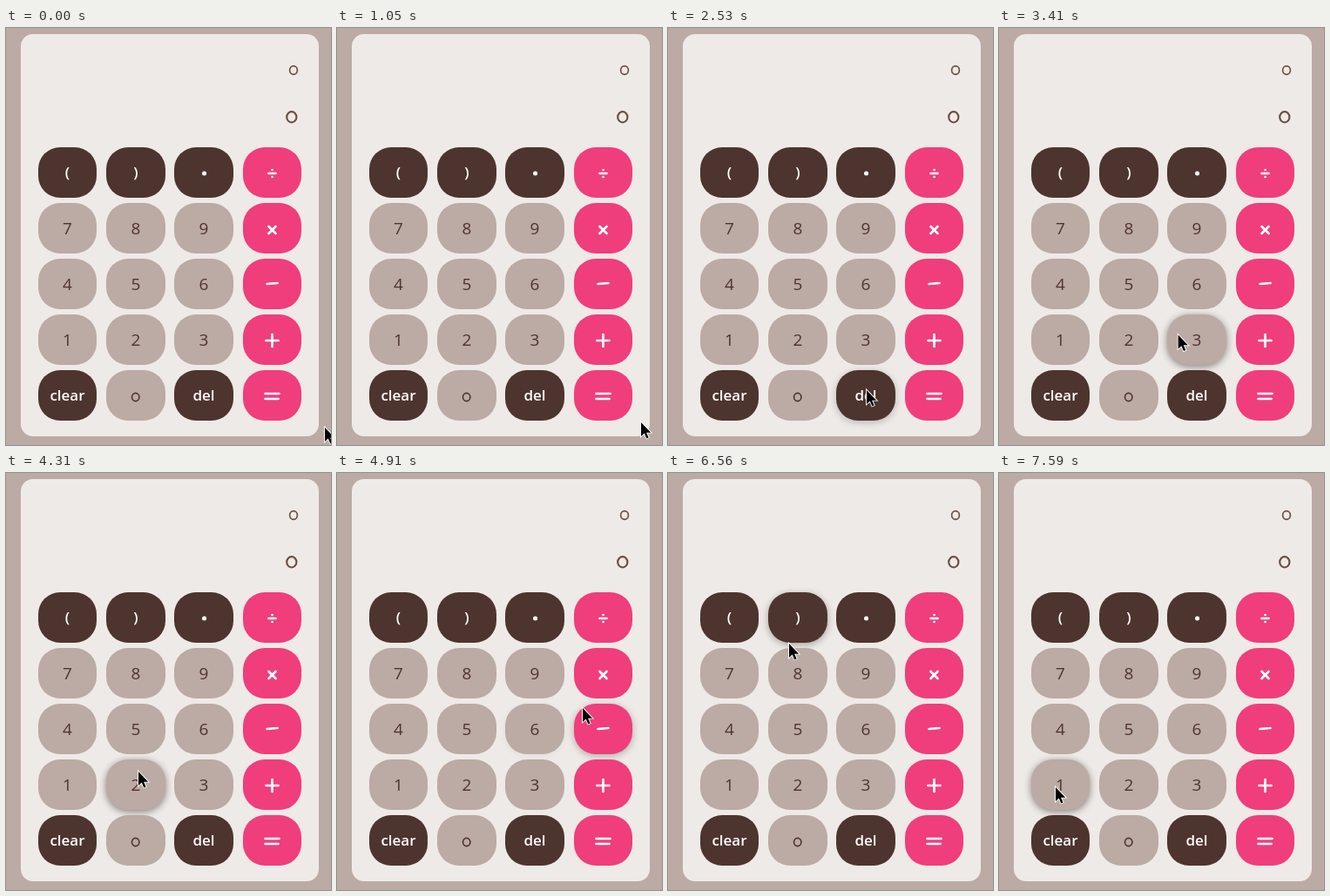
Recreate the animation shown at these times as an HTML page. Size 373 by 479 pixels, loop 8000 ms.

```html
<!DOCTYPE html>
<html lang="en">
<head>
<meta charset="utf-8">
<title>Calculator</title>
<style>
  html, body { margin: 0; width: 100%; height: 100%; overflow: hidden; background: #bcaaa4; }
  svg { display: block; width: 100%; height: 100%; }
  text { font: 600 17px "Open Sans", sans-serif; text-anchor: middle; fill: #fff; }
  .digit { font-weight: 400; font-size: 19px; fill: #4e342e; }
  .mark { fill: none; stroke: #fff; stroke-width: 2.7; stroke-linecap: round; }
  .ring { fill: none; }
</style>
</head>
<body>
<svg id="stage" viewBox="0 0 373 479">
  <defs>
    <filter id="blur" x="-30%" y="-30%" width="160%" height="160%">
      <feGaussianBlur stdDeviation="4"/>
    </filter>
  </defs>
  <rect width="373" height="479" fill="#bcaaa4"/>
  <rect x="17" y="7" width="342" height="462" rx="14" fill="#eeeae7"/>
  <g id="display"></g>
  <g id="keys"></g>
  <path id="cursor" d="M0 0V16L3.7 12.6 6.3 18.4 8.6 17.4 6.1 11.7H11.2Z"
    fill="#000" stroke="#fff" stroke-width="1.8" paint-order="stroke"/>
</svg>
<script>
const LOOP = 8000, STEP = 7590 / 51, FADE = 2, SAMPLES = 10;
const W = 67.4, H = 58, DARK = '#4e342e', LIGHT = '#bcaaa4', PINK = '#ef3e7b';

const labels = ['(', ')', '.', '÷', 7, 8, 9, '×', 4, 5, 6, '−', 1, 2, 3, '+', 'clear', 0, 'del', '='];

// Symbols drawn as plain strokes around the key centre.
const strokes = {
  '.': 'M.5 1h.1',
  '÷': 'M-4 1H4M0-3h.1M0 5h.1',
  '×': 'M-4-2L4 6M4-2L-4 6',
  '−': 'M-6 0L6-1',
  '+': 'M-7 1H7M0-6V8',
  '=': 'M-8-2H8M-8 4H7'
};

// Pointer stops as [step, x, y]; it slows down towards each one.
const stops = [
  [0, 366, 459], [1, 362, 458], [6, 362, 458], [7, 349, 453], [10, 349, 453],
  [13, 280, 400], [16, 262, 408], [17, 228, 416], [22, 225, 356], [29, 152, 343],
  [33, 282, 270], [35, 262, 160], [37, 235, 174], [42, 146, 180], [44, 139, 196], [51, 65, 361]
];

const byId = id => document.getElementById(id);
const cursor = byId('cursor');

function add(parent, tag, attrs, label) {
  const node = document.createElementNS(parent.namespaceURI, tag);
  for (const name in attrs) node.setAttribute(name, attrs[name]);
  if (label !== undefined) node.textContent = label;
  return parent.appendChild(node);
}

function addZero(parent, cx, cy, r, color) {
  add(parent, 'ellipse', {
    class: 'ring', cx, cy, rx: r, ry: r * 1.1, stroke: color, 'stroke-width': r * .38, role: 'img', 'aria-label': 0
  });
}

function addLabel(parent, label) {
  if (label === 0) addZero(parent, -.3, 2, 4.2, DARK);
  else if (label in strokes) {
    const mark = add(parent, 'path', { d: strokes[label], class: 'mark', role: 'img', 'aria-label': label });
    if (label === '.') mark.style.strokeWidth = 5;
  }
  else if (typeof label === 'number') add(parent, 'text', { class: 'digit', y: 7 }, label);
  else add(parent, 'text', { y: 5.5 }, label);
}

function makeKey(label, i) {
  const col = i % 4, row = Math.floor(i / 4);
  const left = 37 + 78.2 * col, x = Math.round(left), width = Math.round(left + W) - x;
  const y = 137 + 64 * row;
  const fill = col === 3 ? PINK : typeof label === 'number' ? LIGHT : DARK;
  const group = add(byId('keys'), 'g', { transform: `translate(${x + width / 2} ${y + H / 2})` });
  const box = { x: -width / 2, y: -H / 2, width, height: H, rx: 25 };
  const shadow = add(group, 'rect', { ...box, y: box.y + 2, filter: 'url(#blur)' });
  add(group, 'rect', { ...box, fill });
  addLabel(group, label);
  const contains = ([px, py]) => px >= x && px <= x + width && py >= y && py <= y + H;
  return { shadow, contains };
}

addZero(byId('display'), 330, 48.5, 4.4, '#6d4c41');
addZero(byId('display'), 327.8, 102.3, 5.6, '#6d4c41');
const keys = labels.map(makeKey);

function pointerAt(step) {
  const next = Math.max(1, stops.findIndex(s => s[0] >= step));
  const [s0, x0, y0] = stops[next - 1], [s1, x1, y1] = stops[next];
  const k = Math.max(0, (step - s0) / (s1 - s0));
  const ease = k * (2 - k);
  return [x0 + (x1 - x0) * ease, y0 + (y1 - y0) * ease];
}

function render(time) {
  const step = Math.min(51, Math.floor(time % LOOP / STEP + .09));
  const trail = Array.from({ length: SAMPLES }, (_, i) => pointerAt(step - i * FADE / SAMPLES));
  cursor.setAttribute('transform', `translate(${trail[0]})`);
  // A key's shadow grows with the share of the recent trail that lies on it.
  for (const { shadow, contains } of keys) {
    shadow.setAttribute('opacity', .45 * trail.filter(contains).length / SAMPLES);
  }
}

const begin = performance.now();
function tick() {
  render(performance.now() - begin);
  requestAnimationFrame(tick);
}
tick();
</script>
</body>
</html>
```
